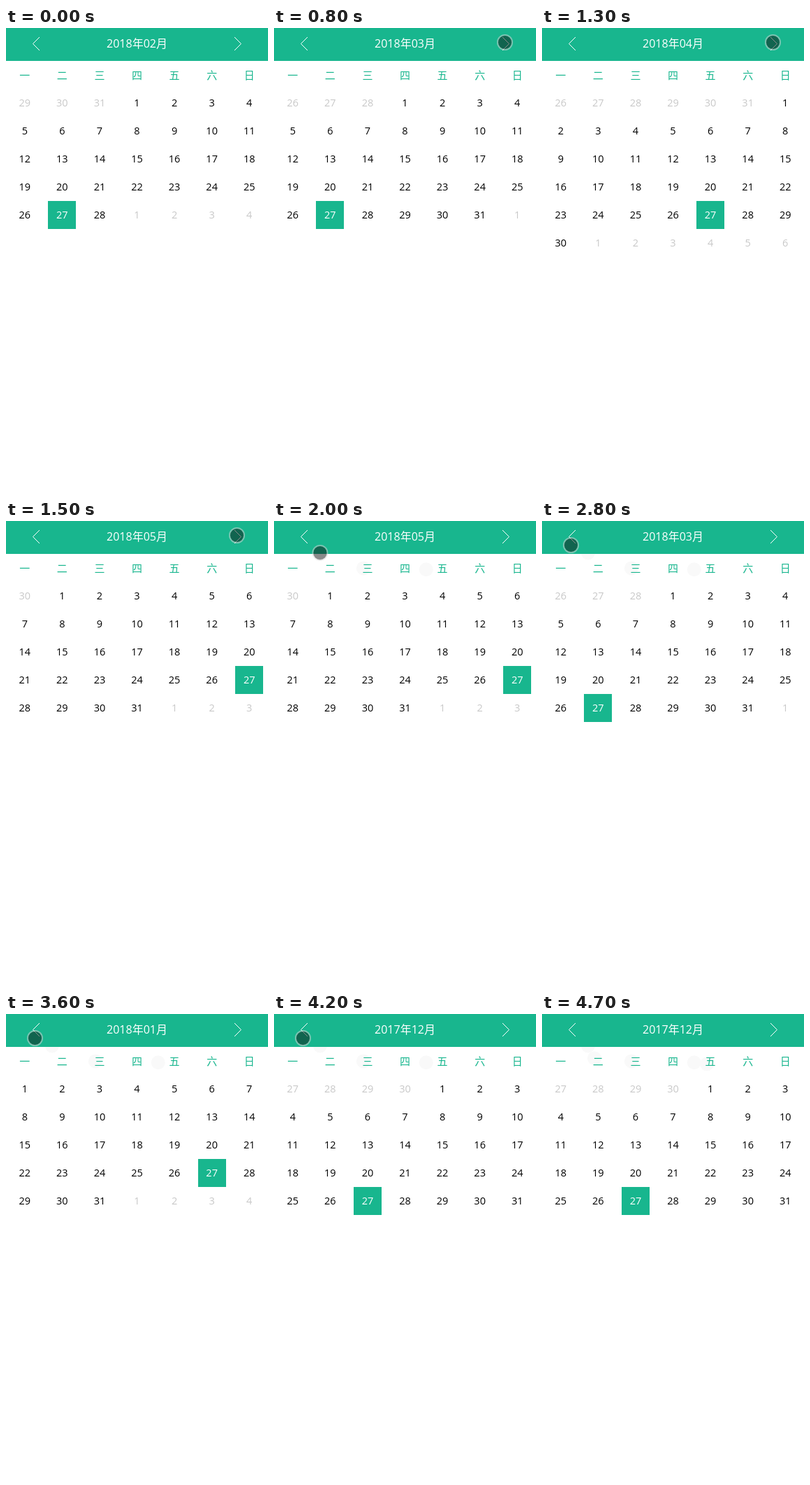
Write an HTML page with a canvas that moves like this. It is 375x664 px and loops after 5.4 s.

```html
<!DOCTYPE html>
<html lang="zh-CN">
<head>
<meta charset="utf-8">
<title>日历</title>
<style>
  html, body { margin: 0; width: 100%; height: 100%; overflow: hidden; background: #fff; }
  canvas { display: block; width: 375px; height: 664px; }
</style>
</head>
<body>
<canvas id="stage"></canvas>
<script>
const W = 375, H = 664, LOOP = 5400, STEP = 100;
const HEAD = 47, COL = W / 7, ROW = 40;
const GREEN = '#18b68e', MUTED = '#c8c8c8';
const FONT = '"Open Sans", "Noto Sans", "Noto Sans CJK SC", "Noto Sans CJK", sans-serif';

// Times at which the arrows are tapped
const NEXT = [800, 1300, 1500];
const PREV = [2400, 2800, 3200, 3600, 4200];

// Pointer glides: arc height, its skew, and the shape of the easing
const ENTER = { t0: 0, t1: 300, from: [341, 19.5], to: [330.5, 20.5], arc: 0, skew: 1, a: 1, b: 1 };
const CROSS = { t0: 1600, t1: 2200, from: ENTER.to, to: [41.5, 34.5], arc: 46, skew: 1, a: 2, b: 4.2 };
const LEAVE = { t0: 4300, t1: 4700, from: CROSS.to, to: [362, 32], arc: 48, skew: 0.7, a: 3, b: 7 };

const canvas = document.getElementById('stage');
const ctx = canvas.getContext('2d');
const dpr = window.devicePixelRatio || 1;
canvas.width = W * dpr;
canvas.height = H * dpr;
ctx.scale(dpr, dpr);
ctx.textAlign = 'center';

const mix = (a, b, p) => a + (b - a) * p;
const taps = (list, t) => list.filter(tap => tap <= t).length;

function disc(x, y, r, color) {
  ctx.fillStyle = color;
  ctx.beginPath();
  ctx.arc(x, y, r, 0, Math.PI * 2);
  ctx.fill();
}

function text(str, x, y, size, color, weight = 400) {
  ctx.font = `${weight} ${size}px ${FONT}`;
  ctx.fillStyle = color;
  ctx.fillText(str, x, y);
}

function chevron(x, dir) {
  ctx.strokeStyle = '#fff';
  ctx.lineWidth = 1;
  ctx.beginPath();
  ctx.moveTo(x, 13);
  ctx.lineTo(x + 9.5 * dir, 22.5);
  ctx.lineTo(x, 32);
  ctx.stroke();
}

function glide({ t0, t1, from, to, arc, skew, a, b }, t) {
  const s = Math.min(1, (t - t0) / (t1 - t0));
  const p = 1 - (1 - s ** a) ** b;
  const lift = arc * Math.sin(Math.PI * p ** skew);
  return { x: mix(from[0], to[0], p), y: mix(from[1], to[1], p) + lift };
}

function pointer(t) {
  if (t < STEP || t >= LEAVE.t1) return null;
  const leg = [LEAVE, CROSS, ENTER].find(g => t >= g.t0);
  return glide(leg, t);
}

// Faint marks the pointer leaves on the white area
function drawTrail(t) {
  for (let past = STEP; past < t; past += STEP) {
    const p = pointer(past);
    if (p && p.y > 40) disc(p.x, p.y, 10, '#f9f9f9');
  }
}

function drawHeader(date) {
  ctx.fillStyle = GREEN;
  ctx.fillRect(0, 0, W, HEAD);
  const month = String(date.getMonth() + 1).padStart(2, '0');
  text(`${date.getFullYear()}年${month}月`, W / 2, 28, 16, '#fff', 500);
  chevron(48, -1);
  chevron(327, 1);
}

function drawDays(first) {
  const year = first.getFullYear(), month = first.getMonth();
  const lead = (first.getDay() + 6) % 7;
  const count = new Date(year, month + 1, 0).getDate();
  const cells = Math.ceil((lead + count) / 7) * 7;

  [...'一二三四五六日'].forEach((d, i) => text(d, COL * (i + 0.5), 72.5, 15, GREEN));

  for (let i = 0; i < cells; i++) {
    const day = new Date(year, month, i - lead + 1);
    const inside = day.getMonth() === month;
    const picked = inside && day.getDate() === 27;
    const x = COL * (i % 7 + 0.5);
    const y = 87 + Math.floor(i / 7) * ROW;
    if (picked) {
      ctx.fillStyle = GREEN;
      ctx.fillRect(Math.round(x - 20), y, 40, 40);
    }
    const color = picked ? '#fff' : inside ? '#000' : MUTED;
    text(day.getDate(), x, y + 25, 14.5, color, picked ? 500 : 400);
  }
}

function drawPointer(p) {
  if (!p) return;
  disc(p.x, p.y, 10, 'rgba(10,10,10,.48)');
  ctx.strokeStyle = 'rgba(220,220,220,.5)';
  ctx.lineWidth = 2;
  ctx.beginPath();
  ctx.arc(p.x, p.y, 10.5, 0, Math.PI * 2);
  ctx.stroke();
}

function draw(t) {
  const first = new Date(2018, 1 + taps(NEXT, t) - taps(PREV, t), 1);
  ctx.fillStyle = '#fff';
  ctx.fillRect(0, 0, W, H);
  drawTrail(t);
  drawHeader(first);
  drawDays(first);
  drawPointer(pointer(t));
}

const start = performance.now();
function tick() {
  const t = (performance.now() - start) % LOOP;
  draw(Math.floor(t / STEP) * STEP);
  requestAnimationFrame(tick);
}
tick();
</script>
</body>
</html>
```
